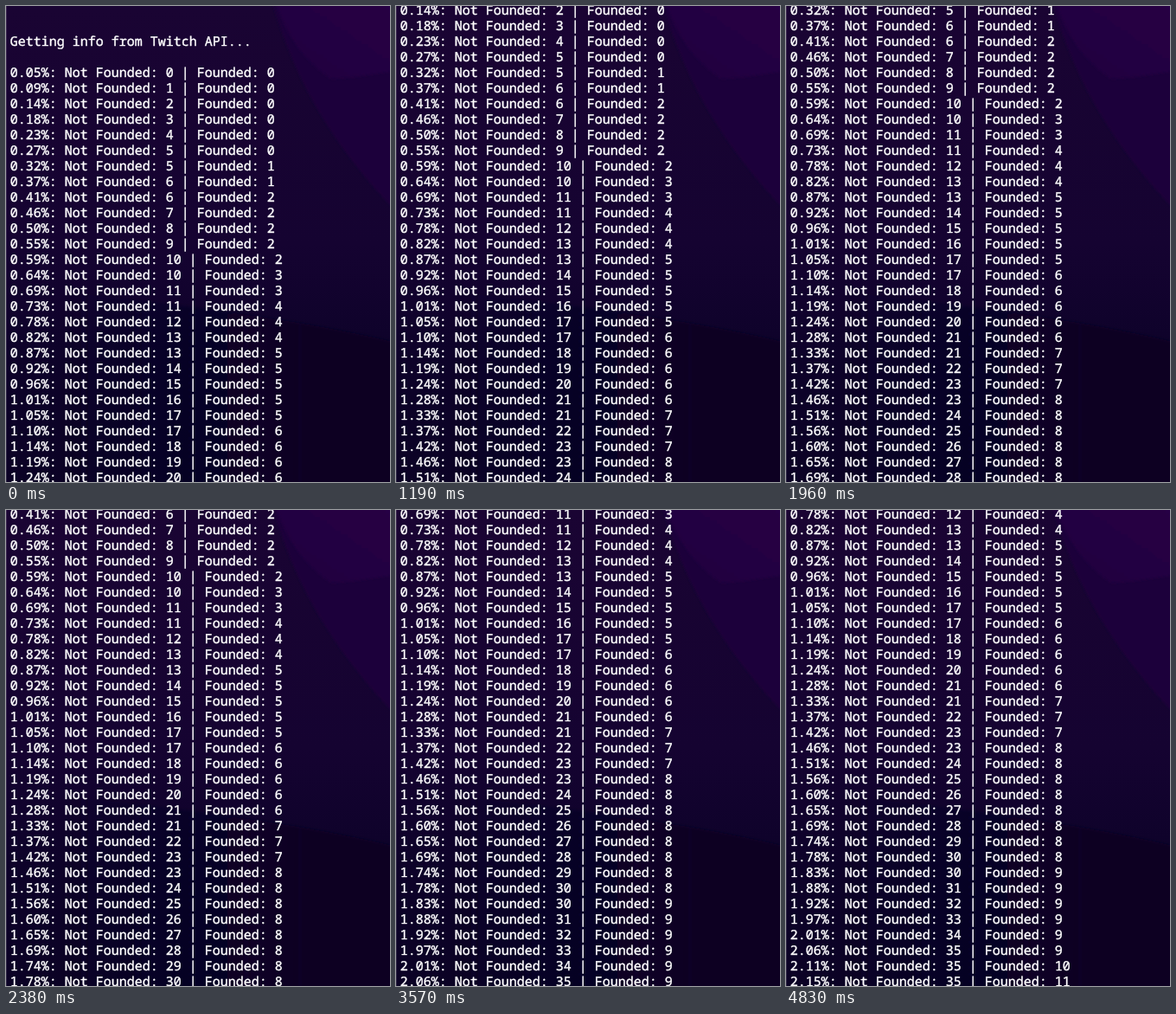
Animation, 444 px wide and 550 px high, one loop 4.9 s. Source, as an HTML page:

```html
<!DOCTYPE html>
<html lang="en">
<head>
<meta charset="utf-8">
<title>Terminal log</title>
<style>
  html, body { margin: 0; width: 100%; height: 100%; overflow: hidden; background: #14032e; }
  svg { display: block; width: 444px; height: 550px; }
  text {
    font: 500 15px "Noto Sans Mono", "DejaVu Sans Mono", monospace;
    fill: #fff;
    stroke: #fff;
    stroke-width: .4px;
    white-space: pre;
    text-rendering: geometricPrecision;
  }
</style>
</head>
<body>
<svg viewBox="0 0 444 550">
  <defs>
    <linearGradient id="base" x1="0" y1="0" x2="0" y2="1">
      <stop offset="0" stop-color="#1a0433"/>
      <stop offset=".5" stop-color="#150331"/>
      <stop offset=".75" stop-color="#0d0229"/>
      <stop offset="1" stop-color="#0b0225"/>
    </linearGradient>
    <linearGradient id="glow" x1="0" y1="1" x2="1" y2="0">
      <stop offset="0" stop-color="#200440"/>
      <stop offset="1" stop-color="#280544"/>
    </linearGradient>
    <linearGradient id="shade" x1="0" y1="0" x2="1" y2="0">
      <stop offset="0" stop-color="#090124" stop-opacity="0"/>
      <stop offset=".7" stop-color="#090124"/>
    </linearGradient>
    <filter id="soft"><feGaussianBlur stdDeviation="1.5"/></filter>
  </defs>
  <rect width="444" height="550" fill="url(#base)"/>
  <path d="M304 -20Q340 130 464 250V-20Z" fill="#1c033a" filter="url(#soft)"/>
  <path d="M308 -20Q324 50 376 84Q410 82 464 72V-20Z" fill="url(#glow)" filter="url(#soft)"/>
  <path d="M60 330Q320 356 464 392V570H60Z" fill="url(#shade)" filter="url(#soft)"/>
  <rect width="1" height="550" fill="#fff" opacity=".16"/>
  <g id="log"></g>
</svg>
<script>
  const LOOP = 4900, LINE = 18, TOTAL = 2185, ROWS = 47;
  const hits = [7, 9, 14, 16, 19, 24, 29, 32, 40, 46, 47];
  const scrollTimes = [0, 560, 630, 770, 910, 1050, 1190, 1330, 1400, 1820, 1960,
    2240, 2380, 2520, 2730, 2870, 3290, 3430, 3570, 3710, 3920];
  const log = document.getElementById('log');

  function addLine(content, y) {
    const line = document.createElementNS(log.namespaceURI, 'text');
    line.setAttribute('x', 4.7);
    line.setAttribute('y', y);
    line.textContent = content;
    log.append(line);
  }

  addLine('Getting info from Twitch API...', 46);
  for (let row = 1; row <= ROWS; row++) {
    const found = hits.filter(hit => hit <= row).length;
    const percent = (row / TOTAL * 100).toFixed(2);
    addLine(`${percent}%: Not Founded: ${row - 1 - found} | Founded: ${found}`, 64 + row * LINE);
  }

  const shift = lines => `translateY(${-lines * LINE}px)`;
  const frames = scrollTimes.map((time, lines) => (
    { offset: time / LOOP, transform: shift(lines), easing: 'step-end' }));
  frames.push({ offset: 1, transform: shift(scrollTimes.length - 1) });
  log.animate(frames, { duration: LOOP, iterations: Infinity });
</script>
</body>
</html>
```
